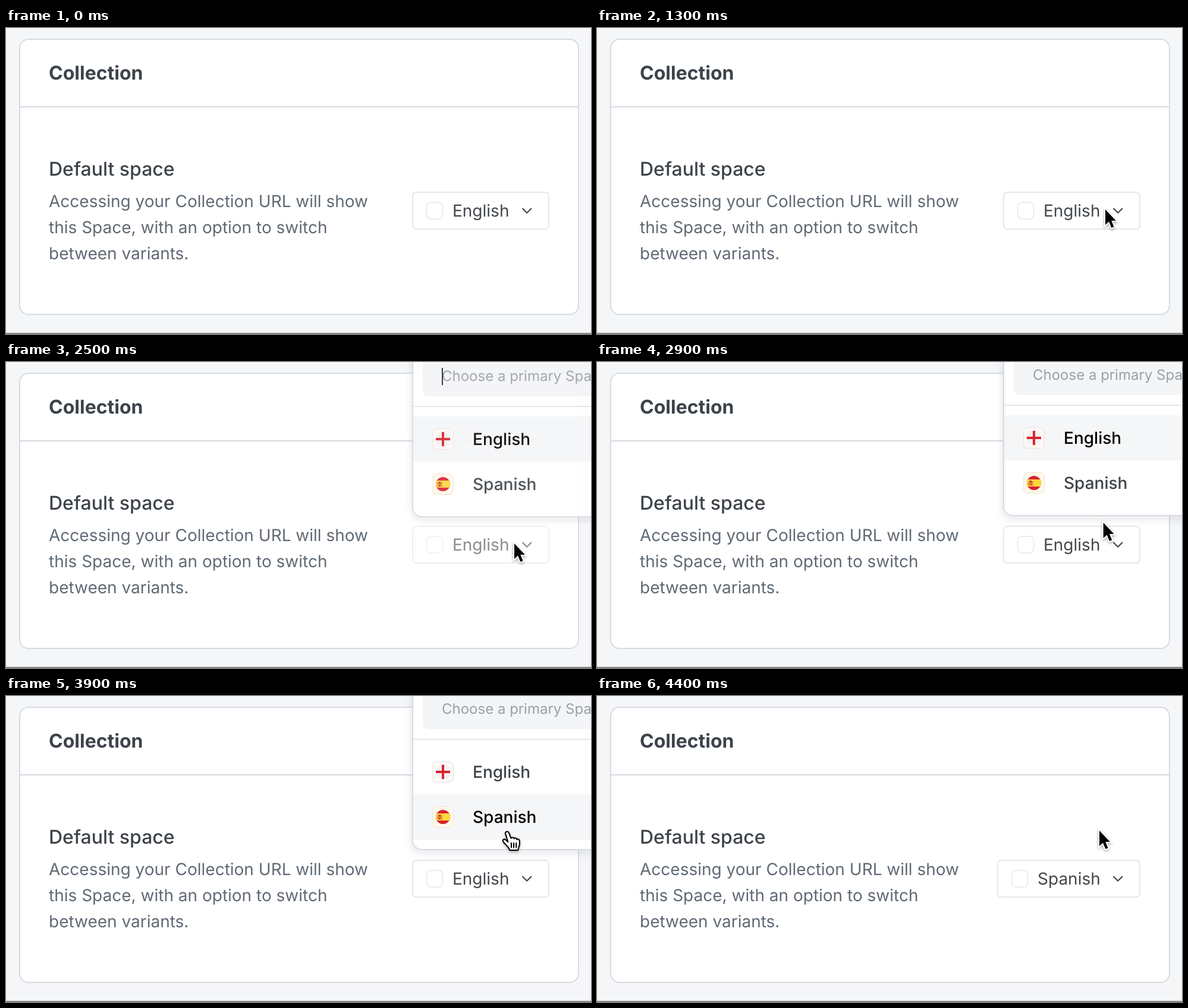
An HTML page that plays this animation: 984x516 px, repeating every 4820 ms.

```html
<!DOCTYPE html>
<html lang="en">
<head>
<meta charset="utf-8">
<title>Default space picker</title>
<style>
  html, body { margin: 0; width: 100%; height: 100%; overflow: hidden; background: #f5f6f8; }
  svg { display: block; width: 984px; height: 516px; }
  text {
    font-family: Inter, "Liberation Sans", sans-serif; font-optical-sizing: none;
    text-rendering: geometricPrecision; white-space: pre;
  }
  .title { font-size: 32px; font-weight: 700; fill: #3d434a; }
  .label { font-size: 32px; font-weight: 500; fill: #3d434a; }
  .body { font-size: 28px; fill: #606a75; }
  .value { font-size: 28px; fill: #43474c; }
  .item { font-size: 28px; font-weight: 500; }
  .hint { font-size: 24px; fill: #98a0ab; }
  .line { fill: none; stroke: #d5dbe2; stroke-width: 2; }
</style>
</head>
<body>
<svg viewBox="0 0 984 516">
  <defs>
    <filter id="soft" x="-50%" y="-50%" width="200%" height="200%">
      <feDropShadow dx="0" dy="2" stdDeviation="2" flood-color="#000" flood-opacity=".35"/>
    </filter>
    <filter id="lift" x="-10%" y="-10%" width="120%" height="130%">
      <feDropShadow dx="0" dy="4" stdDeviation="7" flood-color="#28374b" flood-opacity=".12"/>
    </filter>
    <clipPath id="disc"><circle r="12"/></clipPath>
  </defs>

  <rect width="984" height="516" fill="#f5f6f8"/>
  <rect x="23" y="19" width="940" height="464" rx="15" fill="#fff" stroke="#d5dbe2" stroke-width="2"/>
  <path class="line" d="M24 133H962"/>
  <rect y="514" width="984" height="2" fill="#898a8c"/>

  <text class="title" x="72" y="87">Collection</text>
  <text class="label" x="72" y="249">Default space</text>
  <text class="body" x="72" y="302">Accessing your Collection URL will show</text>
  <text class="body" x="72" y="346">this Space, with an option to switch</text>
  <text class="body" x="72" y="390">between variants.</text>

  <g id="button">
    <rect id="frame" y="277" height="62" rx="6" stroke="#e4e7e9" stroke-width="2"/>
    <rect id="icon" y="294" width="27" height="28" rx="7" fill="#fff" stroke="#e6e8ea" stroke-width="1.5"/>
    <text id="value" class="value" y="318"></text>
    <path d="M869 304.5L876.2 311.7L883.4 304.5" fill="none" stroke="#43474c" stroke-width="2.1" stroke-linecap="round" stroke-linejoin="round"/>
  </g>

  <g id="menu">
    <rect x="684" y="-40" width="360" height="299" rx="15" fill="#fff" stroke="#d5dbe2" stroke-width="2" filter="url(#lift)"/>
    <rect x="701" y="-20" width="320" height="76" rx="9" fill="#f4f5f7"/>
    <text class="hint" x="733" y="30">Choose a primary Space</text>
    <rect id="caret" x="733" y="8" width="2" height="29" fill="#22262b"/>
    <path class="line" d="M685 73H984" style="stroke:#e2e6ea"/>
    <rect id="row" x="685" width="299" height="76" fill="#f5f6f8"/>
    <g transform="translate(735 128)">
      <rect x="-17.5" y="-17.5" width="35" height="35" rx="7" fill="#fcf8f7" stroke="#ecdfdd"/>
      <circle r="12" fill="#f0f0f0"/>
      <path d="M-12 0H12M0 -12V12" stroke="#d8242f" stroke-width="4"/>
    </g>
    <g transform="translate(735 204)">
      <rect x="-17.5" y="-17.5" width="35" height="35" rx="7" fill="#fef8ea" stroke="#f0e5d0"/>
      <g clip-path="url(#disc)">
        <rect x="-12" y="-12" width="24" height="24" fill="#d8242f"/>
        <rect x="-12" y="-6" width="24" height="12" fill="#fbd83c"/>
        <path d="M-9 -3V5M-2 -3V5" stroke="#d98a35" stroke-width="1.5"/>
        <path d="M-7.5 -4H-3.5V3Q-5.5 6 -7.5 3Z" fill="#d0382c"/>
        <path d="M-5.5 -1V2" stroke="#f0b04a" stroke-width="1.5"/>
      </g>
    </g>
    <text id="english" class="item" x="785" y="138">English</text>
    <text id="spanish" class="item" x="785" y="214">Spanish</text>
  </g>

  <g id="cursor">
    <path id="arrow" d="M0 0V26L6 20.6L10.4 31L14.6 29.2L10.3 19H18Z" fill="#000" stroke="#fff" stroke-width="3.6" paint-order="stroke" filter="url(#soft)"/>
    <g id="hand" transform="translate(-11 .5) scale(1.03)" stroke="#000" stroke-width="2" stroke-linejoin="round" stroke-linecap="round" filter="url(#soft)">
      <path fill="#fff" d="M6 4.5C5 1 10 -.5 11.5 3L15 12C16 10 19.5 10.4 20 12.6C21 11 24 11.5 24.6 14C26 13 28.6 13.5 29 16.5V21C29 25 27 27 26.4 31.5H13C12 27 6 22.5 3 18.5C0 15 3.4 12.2 6.4 14.8L10 18Z"/>
      <path fill="none" d="M15.5 20V27M19.5 20V27M23.5 20V27"/>
    </g>
  </g>
</svg>
<script>
const LOOP = 4820, STEP = 100;
const el = id => document.getElementById(id);
const set = (id, attrs) => {
  for (const k in attrs) el(id).setAttribute(k, attrs[k]);
};
const show = (id, on) => set(id, { visibility: on ? "visible" : "hidden" });
const clamp = x => Math.min(1, Math.max(0, x));
const ease = x => 1 - (1 - x) ** 2;

// Each move: start, end, from, to
const moves = [
  [300, 800, [968, 327], [855, 306]],
  [2700, 3300, [855, 306], [849, 243]],
  [3300, 3900, [849, 243], [845, 227]]
];

function pointer(t) {
  const [a, b, p, q] = moves.findLast(m => t >= m[0]) || moves[0];
  const k = ease(clamp((t - a) / (b - a)));
  return p.map((v, i) => v + (q[i] - v) * k);
}

// Opacity and vertical offset while the menu opens or closes
function menuState(t) {
  if (t < 2400) return { alpha: 0, dy: 0 };
  if (t < 4000) {
    const rest = 0.25 ** ((t - 2300) / 150);
    return t < 2700 ? { alpha: 1 - rest * 0.6, dy: rest * 12 } : { alpha: 1, dy: 0 };
  }
  const k = clamp((t - 3900) / 300);
  return { alpha: 1 - k, dy: 6 * k };
}

function buttonAlpha(t) {
  if (t >= 2400 && t < 2700) return t < 2600 ? 0.62 : 0.85;
  if (t >= 4100 && t < 4400) return t < 4300 ? 0.62 : 0.85;
  return 1;
}

function draw(time) {
  const t = Math.floor((time % LOOP) / STEP) * STEP;
  const picked = t >= 4200;
  const hover = t >= 2200 && t < 2400;
  const onSpanish = t >= 3400;
  const left = picked ? 674 : 684;
  const { alpha, dy } = menuState(t);

  set("button", { opacity: buttonAlpha(t) });
  set("frame", { x: left, width: 913 - left, fill: hover ? "#e7eaed" : "#fff" });
  set("icon", { x: left + 23.5 });
  set("value", { x: left + 67 });
  el("value").textContent = picked ? "Spanish" : "English";

  show("menu", alpha > 0);
  set("menu", { opacity: alpha, transform: `translate(0 ${dy})` });
  set("row", { y: onSpanish ? 166 : 90 });
  set("english", { fill: onSpanish ? "#3d434a" : "#000" });
  set("spanish", { fill: onSpanish ? "#000" : "#3d434a" });
  set("caret", { opacity: (t - 2400) % 1000 < 500 ? 1 : 0 });

  const [x, y] = pointer(t);
  const hand = hover || (onSpanish && t < 4200);
  set("cursor", { transform: `translate(${x} ${y})`, display: t < 300 ? "none" : "inline" });
  set("arrow", { display: hand ? "none" : "inline" });
  set("hand", { display: hand ? "inline" : "none" });
}

const start = performance.now();
function tick() {
  draw(performance.now() - start);
  requestAnimationFrame(tick);
}
tick();
</script>
</body>
</html>
```
